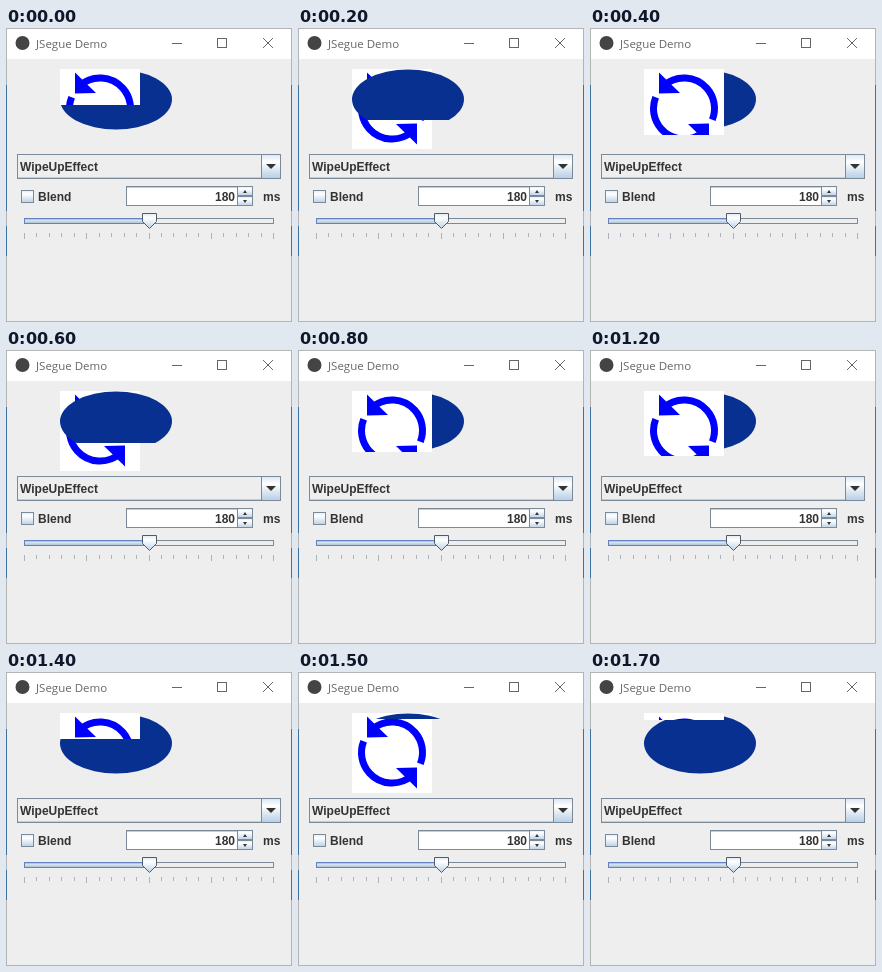
Animation, 286 px wide and 294 px high, one loop 1.8 s. Source, as an HTML page with a canvas:

```html
<!DOCTYPE html>
<html lang="en">
<head>
<meta charset="utf-8">
<title>Wipe transition demo</title>
<style>
  html, body { margin: 0; width: 100%; height: 100%; overflow: hidden; background: #eee; }
  canvas { display: block; }
</style>
</head>
<body>
<canvas id="stage" width="286" height="294"></canvas>
<script>
const ctx = document.getElementById('stage').getContext('2d');
const LOOP = 1800, STEP = 100;
const BORDER = '#7a8a99', INK = '#333', PANEL = '#eee';
const ICON = { x: 54, y: 41, size: 80 };

// Time in ms and wipe phase: even whole parts reveal the arrows, odd ones the ellipse.
const PHASES = [[0, .45], [400, 2.825], [600, 3.65], [1000, 5.88],
                [1200, 6.813], [1500, 9.075], [1700, 10.0875], [1800, 10.45]];

function rect(x, y, w, h, fill) {
  ctx.fillStyle = fill;
  ctx.fillRect(x, y, w, h);
}

function frame(x, y, w, h, color = BORDER) {
  ctx.strokeStyle = color;
  ctx.lineWidth = 1;
  ctx.strokeRect(x + .5, y + .5, w - 1, h - 1);
}

function line(color, ...points) {
  ctx.beginPath();
  for (const [x, y] of points) ctx.lineTo(x, y);
  ctx.strokeStyle = color;
  ctx.lineWidth = 1;
  ctx.stroke();
}

function polygon(fill, ...points) {
  ctx.beginPath();
  for (const [x, y] of points) ctx.lineTo(x, y);
  ctx.closePath();
  ctx.fillStyle = fill;
  ctx.fill();
}

function gloss(y, h) {
  const g = ctx.createLinearGradient(0, y, 0, y + h);
  g.addColorStop(0, '#dde8f3');
  g.addColorStop(.3, '#fff');
  g.addColorStop(1, '#b8cfe5');
  return g;
}

function label(text, x, y, align = 'left') {
  ctx.font = 'bold 12px "Liberation Sans", Arial, sans-serif';
  ctx.textAlign = align;
  ctx.fillStyle = INK;
  ctx.fillText(text, x, y);
}

function drawWindow() {
  rect(0, 0, 286, 294, PANEL);
  rect(1, 0, 284, 31, '#fff');
  frame(0, 0, 286, 294, '#b4b4b4');
  for (const x of [0, 285]) {
    rect(x, 57, 1, 126, '#3b72a0');
    rect(x, 198, 1, 30, '#3b72a0');
  }
  ctx.beginPath();
  ctx.arc(16.5, 15, 7, 0, Math.PI * 2);
  ctx.fillStyle = '#444';
  ctx.fill();

  ctx.font = '11.5px "Open Sans", sans-serif';
  ctx.textAlign = 'left';
  ctx.fillStyle = '#666';
  ctx.fillText('JSegue Demo', 30, 20);

  line('#666', [166, 15.5], [176, 15.5]);
  frame(211, 10, 10, 10, '#666');
  line('#666', [257, 10], [267, 20]);
  line('#666', [267, 10], [257, 20]);
}

function drawCombo() {
  rect(12, 127, 243, 23, PANEL);
  rect(255, 127, 19, 23, gloss(127, 23));
  frame(11, 126, 264, 25);
  line(BORDER, [255.5, 127], [255.5, 150]);
  line('#b8cfe5', [12, 149.5], [255, 149.5]);
  polygon(INK, [260, 136], [270, 136], [265, 141]);
  label('WipeUpEffect', 14, 143);
}

function drawOptions() {
  rect(15, 162, 13, 13, gloss(162, 13));
  frame(15, 162, 13, 13);
  label('Blend', 32, 173);

  rect(120, 158, 112, 20, '#fff');
  frame(120, 158, 112, 20);
  line('#b8cfe5', [121, 159.5], [231, 159.5]);
  label('180', 229, 173, 'right');
  for (const y of [158, 168]) {
    rect(231, y, 16, 10, gloss(y, 10));
    frame(231, y, 16, 10);
  }
  polygon(INK, [237, 165], [241, 165], [239, 162]);
  polygon(INK, [237, 172], [241, 172], [239, 175]);
  label('ms', 257, 173);
}

function drawSlider() {
  rect(18, 190, 250, 6, PANEL);
  const fill = ctx.createLinearGradient(0, 190, 0, 196);
  fill.addColorStop(0, '#7d9cc6');
  fill.addColorStop(.4, '#d5e3f2');
  fill.addColorStop(1, '#a3b8cc');
  rect(18, 190, 126, 6, fill);
  frame(18, 190, 250, 6);
  frame(18, 190, 126, 6, '#6382bf');

  for (let i = 0; i <= 20; i++) {
    const x = 18 + Math.round(i * 12.45);
    rect(x, 205, 1, i % 5 ? 4 : 6, '#a9b4bf');
  }

  const thumb = [[136.5, 185.5], [150.5, 185.5], [150.5, 193.5], [143.5, 200.5], [136.5, 193.5]];
  polygon(gloss(185, 16), ...thumb);
  line('#4f5b67', ...thumb, thumb[0]);
}

function drawArrows() {
  rect(ICON.x, ICON.y, ICON.size, ICON.size, '#fff');
  ctx.save();
  ctx.translate(94, 80.5);
  for (let i = 0; i < 2; i++) {
    ctx.beginPath();
    ctx.arc(0, 0, 30.5, -2.3, .38);
    ctx.strokeStyle = '#00f';
    ctx.lineWidth = 7;
    ctx.stroke();
    polygon('#00f', [-25, -36], [-25, -15], [-4, -15.5]);
    ctx.rotate(Math.PI);
  }
  ctx.restore();
}

function drawEllipse() {
  ctx.beginPath();
  ctx.ellipse(110, 71.5, 56, 30, 0, 0, Math.PI * 2);
  ctx.fillStyle = '#083090';
  ctx.fill();
}

function phaseAt(time) {
  const next = PHASES.findIndex(([t]) => t > time);
  const [t0, p0] = PHASES[next - 1], [t1, p1] = PHASES[next];
  return p0 + (p1 - p0) * (time - t0) / (t1 - t0);
}

function drawWipe(phase) {
  const turn = Math.floor(phase);
  const [below, above] = turn % 2 ? [drawArrows, drawEllipse] : [drawEllipse, drawArrows];
  below();
  ctx.save();
  ctx.beginPath();
  ctx.rect(ICON.x, ICON.y, 113, Math.round((phase - turn) * ICON.size));
  ctx.clip();
  above();
  ctx.restore();
}

function render() {
  const time = Math.floor(performance.now() % LOOP / STEP) * STEP;
  drawWindow();
  drawCombo();
  drawOptions();
  drawSlider();
  drawWipe(phaseAt(time));
  requestAnimationFrame(render);
}

render();
</script>
</body>
</html>
```
